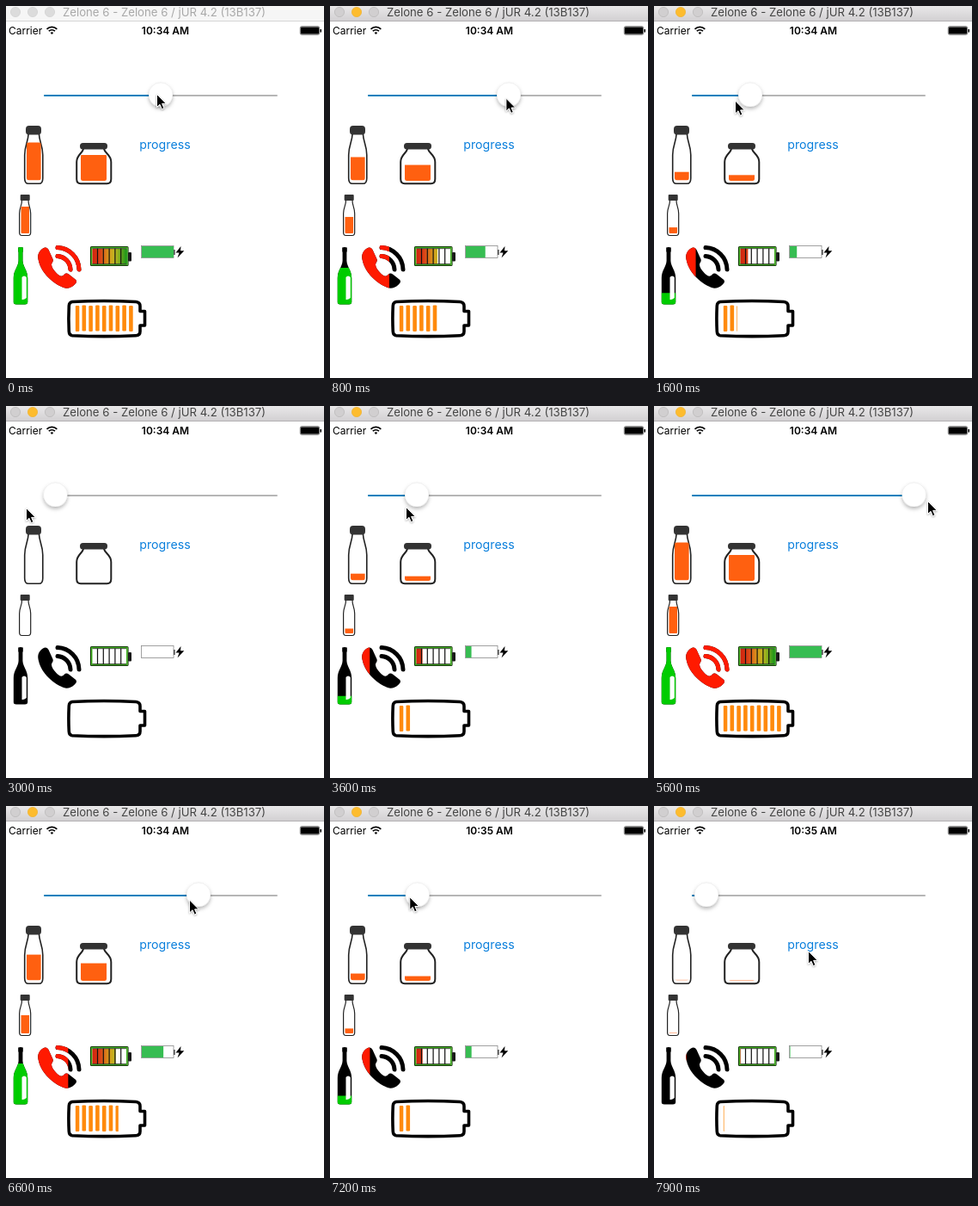
An HTML page for the animation above (8 s loop, 370 by 432 pixels).

```html
<!DOCTYPE html>
<html lang="en">
<head>
<meta charset="utf-8">
<title>Progress icons</title>
<style>
  html, body { margin: 0; width: 100%; height: 100%; overflow: hidden; background: #fff; }
  svg { display: block; width: 370px; height: 432px; }
  text { font-family: Inter, Roboto, "Liberation Sans", sans-serif; }
</style>
</head>
<body>
<svg viewBox="0 0 370 432" xmlns="http://www.w3.org/2000/svg">
  <defs>
    <linearGradient id="bar" x2="0" y2="1">
      <stop offset="0" stop-color="#e9e8e9"/><stop offset="1" stop-color="#d2d0d2"/>
    </linearGradient>
    <linearGradient id="heat" gradientUnits="userSpaceOnUse" x1="100" x2="140">
      <stop offset="0" stop-color="#d01f0c"/><stop offset=".25" stop-color="#dc4418"/>
      <stop offset=".5" stop-color="#d89c1c"/><stop offset=".68" stop-color="#bcb820"/>
      <stop offset="1" stop-color="#1c961a"/>
    </linearGradient>
    <filter id="shade" x="-50%" y="-50%" width="200%" height="200%">
      <feDropShadow dx="0" dy="2.5" stdDeviation="2.2" flood-color="#000" flood-opacity=".28"/>
    </filter>
    <filter id="soft" x="-50%" y="-50%" width="200%" height="200%">
      <feDropShadow dx="0" dy="1" stdDeviation="1" flood-color="#000" flood-opacity=".35"/>
    </filter>
    <path id="wine" d="M14.200 280.500Q17 279.500 19.800 280.500V285L19.400 286V296C19.800 303 25.200 307 25.200 316V344Q25 346.500 22 346.500H12Q8.800 346.500 8.800 344V316C8.800 307 14.200 303 14.600 296V286L14.200 285Z"/>
    <g id="phone">
      <path stroke="none" d="M43 281.500C39 284 36.500 288 37.500 294C40 308 52 321 67 327C73 329 78 326 81.500 321.500Q83 319 80 317L73 311.500Q70 309.500 67.500 312C65 315 62 313.500 59 310.500C55 306.500 53 303 53 300.500C53 298 55.500 297 54.500 294L49.500 283Q47 279 43 281.500Z"/>
      <path d="M60 280.500A26 26 0 0 1 85 306M60 290.500A16 16 0 0 1 75 306" fill="none" stroke-width="5" stroke-linecap="round"/>
    </g>
    <clipPath id="wineClip"><rect id="wineLevel" x="0" width="40"/></clipPath>
    <clipPath id="phoneClip"><rect id="phoneLevel" x="36" y="270" height="65"/></clipPath>
    <clipPath id="barsClip"><rect id="barsLevel" x="80.5" y="340" height="46"/></clipPath>
    <clipPath id="tallClip"><rect x="24" y="158" width="16.800" height="44.500" rx="3"/></clipPath>
    <clipPath id="jarClip"><rect x="87" y="172" width="30" height="31" rx="2.500"/></clipPath>
    <clipPath id="smallClip"><rect x="17.300" y="232" width="9.900" height="32" rx="1.500"/></clipPath>
  </defs>

  <!-- window title bar -->
  <rect id="titleBar" width="370" height="17"/>
  <rect id="titleEdge" y="17" width="370" height="1"/>
  <g id="lights" stroke-width=".7">
    <circle cx="11" cy="7" r="5.6"/><circle cx="31" cy="7" r="5.6"/><circle cx="51" cy="7" r="5.6"/>
  </g>
  <text id="title" x="66" y="12" font-size="13.200">Zelone 6 - Zelone 6 / jUR 4.2 (13B137)</text>

  <!-- status bar -->
  <text x="3" y="33" font-size="12">Carrier</text>
  <g fill="none" stroke="#000" stroke-width="1.8">
    <path d="M47.500 26.800A8.600 8.600 0 0 1 59.300 26.800M49.800 29.200A5.400 5.400 0 0 1 57 29.200"/>
    <path d="M53.400 33L51.600 31Q53.400 29.600 55.200 31Z" fill="#000" stroke="none"/>
  </g>
  <text id="clock" x="185.500" y="32.500" font-size="12" font-weight="600" text-anchor="middle"></text>
  <rect x="342.300" y="23.800" width="22.400" height="9.400" rx="1.800" fill="#fff" stroke="#000" stroke-width=".6"/>
  <rect x="343" y="24.500" width="21" height="8" rx="1"/>
  <rect x="365.500" y="27" width="1.500" height="3.500"/>

  <text x="185" y="165.500" font-size="14.200" fill="#0a7fdc" text-anchor="middle">progress</text>

  <!-- tall bottle -->
  <rect x="23" y="139" width="18" height="10.500" rx="3.800" fill="#333"/>
  <path d="M26 149C26 157 21.700 162 21.700 173V200Q21.700 206.300 26 206.300H38.500Q42.800 206.300 42.800 200V173C42.800 162 38.500 157 38.500 149" fill="none" stroke="#222" stroke-width="1.600"/>
  <g clip-path="url(#tallClip)"><rect id="tall" x="24" width="16.800" fill="#ff6010"/></g>

  <!-- jar -->
  <rect x="86" y="159" width="32" height="7.500" rx="3.500" fill="#333"/>
  <path d="M90 166C89 171 82.200 173 82.200 181V201Q82.200 206.200 87 206.200H117.500Q122.300 206.200 122.300 201V181C122.300 173 115 171 114 166" fill="none" stroke="#222" stroke-width="2"/>
  <g clip-path="url(#jarClip)"><rect id="jar" x="87" width="30" fill="#ff6010"/></g>

  <!-- small bottle -->
  <rect x="16.700" y="219" width="11" height="7" rx="1" fill="#333"/>
  <path d="M18.500 226C18.500 232 15.600 234 15.600 241V263Q15.600 266.500 18.500 266.500H25.800Q28.700 266.500 28.700 263V241C28.700 234 26 232 26 226" fill="none" stroke="#222" stroke-width="1.200"/>
  <g clip-path="url(#smallClip)"><rect id="small" x="17.300" width="9.900" fill="#ff6010"/></g>

  <!-- wine bottle -->
  <use href="#wine"/>
  <use href="#wine" fill="#0c0" clip-path="url(#wineClip)"/>
  <path d="M18.500 315Q21 312 23.800 315V339Q21 341.500 18.500 341Z" fill="#fff"/>

  <!-- phone -->
  <use href="#phone" stroke="#000"/>
  <g clip-path="url(#phoneClip)"><use href="#phone" fill="#ff1a00" stroke="#ff1a00"/></g>

  <!-- cell battery -->
  <rect x="98.500" y="279.500" width="43.500" height="22" rx="1" fill="#fff" stroke="#14300c" stroke-width="1.200"/>
  <rect x="99.700" y="280.700" width="41.100" height="19.600" fill="none" stroke="#3fae1e" stroke-width="1.600"/>
  <rect x="142" y="286" width="4" height="10.500" rx="1" fill="#1a1a1a"/>
  <rect id="cells" x="100.500" y="282" height="17.500" fill="url(#heat)"/>
  <path d="M106.500 281.500V300M113.300 281.500V300M120.100 281.500V300M126.900 281.500V300M133.700 281.500V300" stroke="#111" stroke-width="1.200"/>
  <path d="M100.500 281.700H140M100.500 299.700H140" stroke="#222" stroke-width=".8"/>

  <!-- charging battery -->
  <rect x="157.500" y="278.500" width="37.500" height="14" fill="#fff" stroke="#8a8a8a" stroke-width=".8"/>
  <rect x="195" y="283" width="1.700" height="6" fill="#555"/>
  <rect id="charge" x="158" y="279" height="13.200" fill="#37bd52"/>
  <path d="M203.500 279L197.500 286.500H201.500L199.500 292.500L207.300 284.300H203Z"/>

  <!-- large battery -->
  <path d="M77 343.500Q114 341.500 151 343.500Q156 344 156 348.500V354.500H161.500V371H156V378Q156 382.500 151 382.700Q114 384.500 77 382.700Q73.500 382.300 73.300 378Q72.500 363 73.300 348Q73.600 344 77 343.500Z" fill="none" stroke="#000" stroke-width="3.600" stroke-linejoin="round"/>
  <g id="bars" clip-path="url(#barsClip)" fill="#ff8a0c"></g>

  <!-- slider -->
  <rect x="44" y="103" width="272" height="2" rx="1" fill="#b6b6b6"/>
  <rect id="track" x="44" y="103" height="2" rx="1" fill="#0a80bd"/>
  <circle id="knob" cy="103" r="14" fill="#fff" stroke="#000" stroke-opacity=".1" stroke-width=".5" filter="url(#shade)"/>

  <path id="cursor" d="M.5 .5V15.500L4 12.300L6.300 17.700L8.900 16.600L6.600 11.400H11.300Z" stroke="#fff" stroke-width="1" filter="url(#soft)"/>
</svg>
<script>
const LOOP = 8000, STEP = 100;
const MIN = 57.5, MAX = 302.5;
const $ = id => document.getElementById(id);
const set = (el, attrs) => { for (const k in attrs) el.setAttribute(k, attrs[k]); };

// [time, x]
const knobPath = [
  [0, 180], [100, 180], [600, 232], [1600, 112], [2000, MIN], [3000, MIN],
  [3300, 135], [3600, 101], [3800, 82], [4700, 260], [5000, MAX],
  [6100, MAX], [6600, 224], [7400, 61], [LOOP, 61]
];
// [time, x, y]
const cursorPath = [
  [0, 175, 102], [100, 175, 102], [600, 232, 106], [1600, 94, 109.5], [2100, 40, 116],
  [2700, 23, 118], [3000, 23, 118], [3250, 135, 118], [3600, 88, 117], [3750, 72, 117],
  [4700, 266, 122], [4950, 308, 116], [5600, 318, 110], [6000, 318, 110],
  [6600, 213, 108.5], [7400, 52, 104], [7900, 179, 168], [LOOP, 179, 168]
];

function at(path, t) {
  const i = Math.max(1, path.findIndex(p => p[0] >= t));
  const a = path[i - 1], b = path[i];
  const u = (t - a[0]) / (b[0] - a[0]);
  return a.slice(1).map((n, k) => n + (b[k + 1] - n) * u);
}

for (let i = 0; i < 9; i++) {
  const bar = document.createElementNS("http://www.w3.org/2000/svg", "rect");
  set(bar, { x: 80.7 + 7.8 * i, y: 348 - i % 2 * .6, width: 4.6, height: 30, rx: 1.2 });
  $("bars").append(bar);
}

function rise(id, bottom, height, v) {
  set($(id), { y: bottom - height * v, height: height * v });
}

function drawWindow(active) {
  set($("titleBar"), { fill: active ? "url(#bar)" : "#f6f6f6" });
  set($("titleEdge"), { fill: active ? "#b3b1b3" : "#d6d6d6" });
  set($("title"), { fill: active ? "#444" : "#a8a8a8" });
  [...$("lights").children].forEach((c, i) => {
    const lit = active && i === 1;
    set(c, {
      fill: lit ? "#fdbc2e" : active ? "#d1cfd0" : "#dcdcdc",
      stroke: lit ? "#f0b02a" : active ? "#b8b6b7" : "#d0d0d0"
    });
  });
}

function drawLevels(v) {
  rise("tall", 202.5, 44, v);
  rise("jar", 203, 30, v);
  rise("small", 264, 31, v);
  rise("wineLevel", 350, 75, v);
  set($("phoneLevel"), { width: 1 + 52 * v });
  set($("cells"), { width: 40 * v });
  set($("charge"), { width: 37 * v });
  set($("barsLevel"), { width: 74 * v });
}

function draw(t) {
  const [x] = at(knobPath, t);
  const [cx, cy] = at(cursorPath, t);
  const touched = t >= 100;
  drawWindow(touched);
  drawLevels(touched ? (x - MIN) / (MAX - MIN) : 1);
  $("clock").textContent = t < 6800 ? "10:34 AM" : "10:35 AM";
  set($("knob"), { cx: x });
  set($("track"), { width: x - 44 });
  set($("cursor"), { transform: `translate(${cx} ${cy})` });
}

const start = performance.now();
function tick() {
  const t = (performance.now() - start) % LOOP;
  draw(Math.floor(t / STEP) * STEP);
  requestAnimationFrame(tick);
}
draw(0);
requestAnimationFrame(tick);
</script>
</body>
</html>
```
